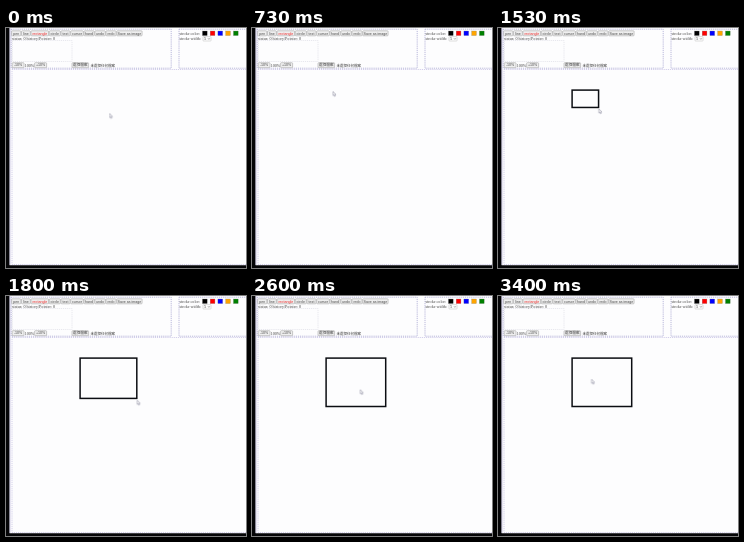
Recreate the animation shown at these times as an HTML page. Size 240 by 240 pixels, loop 3470 ms.

```html
<!DOCTYPE html>
<html lang="en">
<head>
<meta charset="utf-8">
<title>Drawing board</title>
<style>
  html, body { margin: 0; width: 100%; height: 100%; overflow: hidden; background: #fdfdfe; }
  svg { display: block; width: 100vw; height: 100vh; }
  text { font: 4px Arial, "Liberation Sans", "Noto Sans CJK TC", sans-serif; fill: #444; }
  .serif { font: 4.1px "Times New Roman", "Liberation Serif", "Noto Sans CJK TC", serif; }
  .button rect { fill: #efefef; stroke: #999; stroke-width: .5; }
  .button text { text-anchor: middle; font-size: 3.6px; }
  .button .active { fill: #e22; }
  .panel { fill: none; stroke: #a9a6d2; stroke-width: .8; stroke-dasharray: 1.2 .9; }
  .faint { stroke: #e2e2ea; }
  .board { stroke: #c9c5e6; }
  #shape {
    fill: none; stroke: #0b0d12; stroke-width: 1.5;
    animation: draw 3470ms linear infinite, show 3470ms step-end infinite;
  }
  #pointer { animation: move 3470ms linear infinite; }
  @keyframes show {
    0% { visibility: hidden; }
    37.5% { visibility: visible; }
  }
  @keyframes draw {
    0%, 37.5% { width: 0; height: 0; }
    44% { width: 26px; height: 17px; }
    51.9% { width: 56.7px; height: 40.3px; }
    59%, 100% { width: 59.6px; height: 48.4px; }
  }
  @keyframes move {
    0%, 6% { transform: translate(103.5px, 85.5px); }
    19%, 25% { transform: translate(81px, 63.5px); }
    33%, 37.5% { transform: translate(74.5px, 62.3px); }
    44% { transform: translate(100.4px, 80.5px); }
    51.9% { transform: translate(131.2px, 104.3px); }
    59%, 66% { transform: translate(134.3px, 112px); }
    80%, 100% { transform: translate(93.6px, 83.3px); }
  }
</style>
</head>
<body>
<svg id="stage" viewBox="0 0 240 240">
  <rect width="240" height="240" fill="#fdfdfe"/>
  <rect class="panel board" x="6" y="41.5" width="240" height="195"/>
  <rect class="panel" x="5.2" y="1.2" width="160" height="39"/>
  <rect class="panel" x="173" y="1.2" width="80" height="39"/>
  <rect class="panel faint" x="6.5" y="12.5" width="59.5" height="21"/>

  <g id="tools"></g>
  <text class="serif" x="6" y="11.6" textLength="auto">status: 0 history/Pointer: 0</text>
  <text class="serif" x="18.7" y="38.6">100%</text>
  <text class="serif" x="84.5" y="38.6" style="font-size:3.5px">未選擇任何檔案</text>

  <text class="serif" x="173.5" y="7">stroke color:</text>
  <text class="serif" x="173.5" y="12">stroke width:</text>
  <g id="swatches"></g>
  <rect x="197" y="8.6" width="8" height="4.4" rx=".6" fill="#fff" stroke="#aaa" stroke-width=".4"/>
  <text x="198.2" y="12.1" style="font-size:3.6px">5</text>
  <path d="M202 10.3l.9 1 .9-1" fill="none" stroke="#444" stroke-width=".5"/>

  <rect id="shape" x="74.1" y="62.1" width="0" height="0"/>
  <path id="pointer" d="M0 0V4.2L1 3.3 1.7 4.8 2.3 4.5 1.7 3.1H3Z" fill="#fff" stroke="#7c7d92" stroke-width=".5"/>

  <path d="M0 0H3.6V237.2H240V240H0Z" fill="#050507"/>
  <path d="M4 0V237" stroke="#c3bedf" stroke-width=".8"/>
</svg>
<script>
  const ns = "http://www.w3.org/2000/svg";

  function add(parent, tag, attrs, text = "") {
    const el = document.createElementNS(ns, tag);
    for (const key in attrs) el.setAttribute(key, attrs[key]);
    el.textContent = text;
    return parent.appendChild(el);
  }

  const tools = document.getElementById("tools");

  function button(label, x, y, width, active) {
    const g = add(tools, "g", { class: "button" });
    add(g, "rect", { x, y, width, height: 5, rx: .7 });
    add(g, "text", { x: x + width / 2, y: y + 3.7, class: active ? "active" : "" }, label);
  }

  let x = 5.6;
  const bar = [
    ["pen", 9.2], ["line", 8.8], ["rectangle", 17.6], ["circle", 11], ["text", 9],
    ["cursor", 12.6], ["hand", 10.2], ["undo", 10.4], ["redo", 10], ["Save as image", 25.4]
  ];
  for (const [label, width] of bar) {
    button(label, x, 2.8, width, label === "rectangle");
    x += width + .7;
  }
  button("-10%", 6.2, 34.7, 11.8);
  button("+10%", 28.6, 34.7, 12);
  button("選擇檔案", 66, 34.7, 16.6);

  ["#000", "#f00", "#00f", "#ffa500", "#008000"].forEach((fill, i) =>
    add(document.getElementById("swatches"), "rect",
      { x: 196.4 + i * 7.75, y: 3, width: 4.8, height: 4.6, fill, stroke: "#888", "stroke-width": .3 }));
</script>
</body>
</html>
```
